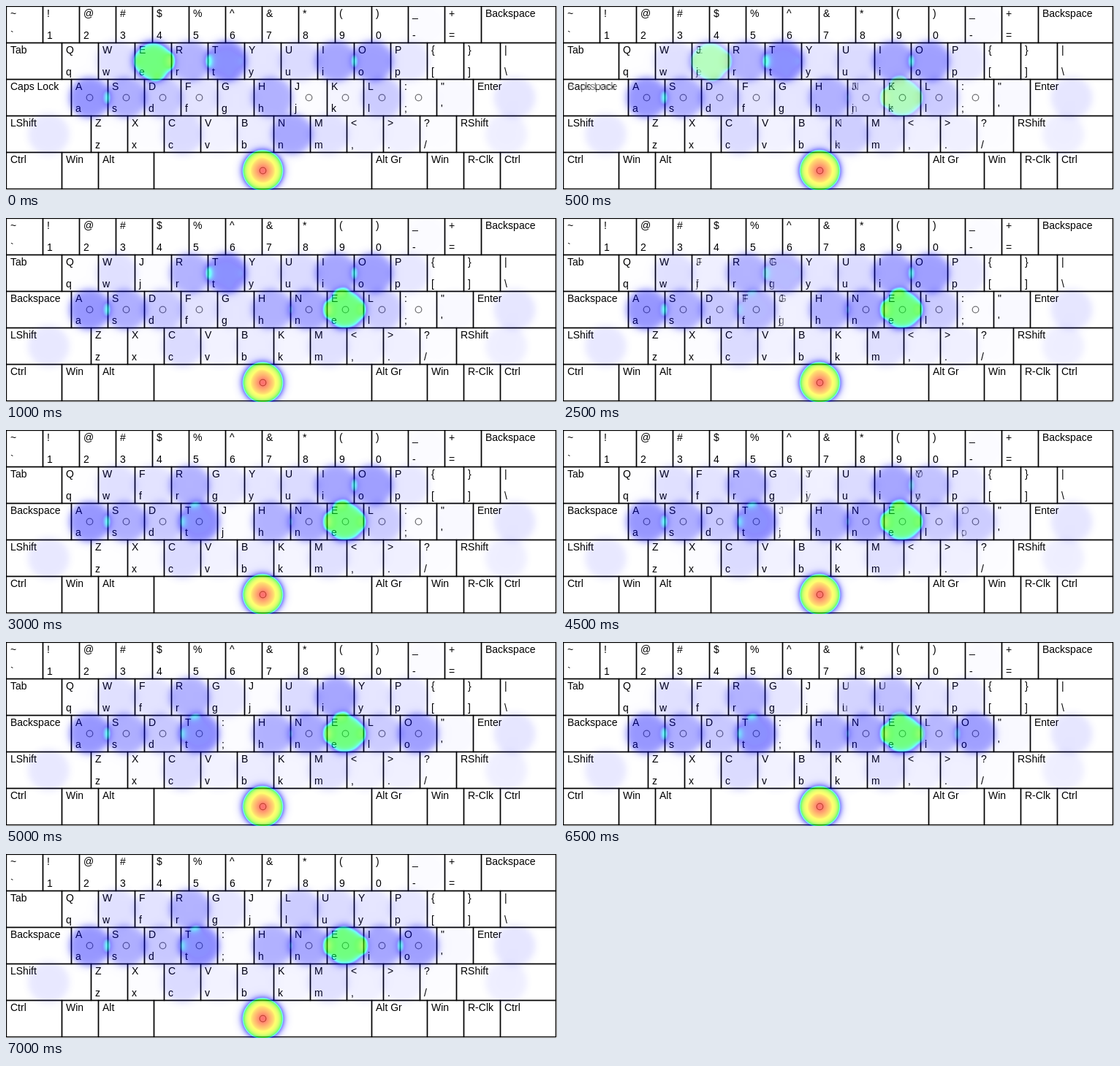
An HTML page with a canvas that plays this animation: 754x252 px, repeating every 8 s.

```html
<!DOCTYPE html>
<html lang="en">
<head>
<meta charset="utf-8">
<title>Keyboard layout heat map</title>
<style>
html, body { margin: 0; width: 754px; height: 252px; overflow: hidden; background: #fff; }
.layer, .layer > * { position: absolute; left: 0; top: 0; width: 754px; height: 252px; display: block; }
text { font: 14px "Liberation Sans", Arial, sans-serif; white-space: pre; }
rect { fill: none; stroke: #000; stroke-width: 1.4; }
circle { fill: none; stroke: #777; stroke-width: 1.3; }
</style>
</head>
<body>
<script>
const W = 754, H = 252, LOOP = 8000;

// Letter rows of each layout, and the label of the key left of the home row.
const layouts = [
  ["qwertyuiop", "asdfghjkl;", "zxcvbnm", "Caps Lock"],
  ["qwjrtyuiop", "asdfghnel;", "zxcvbkm", "Backspace"],
  ["qwfrgyuiop", "asdtjhnel;", "zxcvbkm", "Backspace"],
  ["qwfrgjuiyp", "asdt;hnelo", "zxcvbkm", "Backspace"],
  ["qwfrgjluyp", "asdt;hneio", "zxcvbkm", "Backspace"]
];

// Key use in percent of typed characters.
const freq = {
  e: 12.8, t: 9.1, a: 8.2, o: 7.5, i: 7, n: 6.8, s: 6.3, h: 6.1, r: 6, d: 4.3, l: 4,
  c: 2.8, u: 2.8, m: 2.4, w: 2.4, f: 2.2, g: 2, y: 2, p: 1.9, b: 1.5, v: 1, k: 0.8,
  j: 0.2, x: 0.2, q: 0.1, z: 0.1, ",": 1.2, ".": 1.2, "'": 0.5, "-": 0.3, ";": 0.2,
  "/": 0.2, LShift: 1.8, RShift: 1.3, Enter: 2
};
const shifted = {
  "`": "~", "1": "!", "2": "@", "3": "#", "4": "$", "5": "%", "6": "^", "7": "&",
  "8": "*", "9": "(", "0": ")", "-": "_", "=": "+", "[": "{", "]": "}", "\\": "|",
  ";": ":", "'": "\"", ",": "<", ".": ">", "/": "?"
};

// Colour stops: level, red, green, blue.
const ramp = [
  [0.45, 0, 0, 255], [0.55, 0, 255, 255], [0.65, 0, 255, 0],
  [0.95, 255, 255, 0], [1, 255, 0, 0]
];

function keysOf([top, home, bottom, caps]) {
  const rows = [
    [0, ..."`1234567890-=", ["Backspace", 650]],
    [76, ["Tab", 0], ...top, ..."[]", ["\\", 676]],
    [89, [caps, 0], ...home, "'", ["Enter", 639]],
    [116, ["LShift", 0], ...bottom, ...",./", ["RShift", 616]],
    [0, ["Ctrl", 0], ["Win", 76], ["Alt", 126], ["", 202], ["Alt Gr", 500],
      ["Win", 576], ["R-Clk", 626], ["Ctrl", 676]]
  ];
  const keys = [];
  rows.forEach(([x0, ...row], r) => {
    let next = x0;
    const line = row.map(k => {
      if (Array.isArray(k)) return { name: k[0], x: k[1] };
      const key = { name: k, x: next };
      next += 50;
      return key;
    });
    line.forEach((k, i) => {
      k.y = r * 50;
      k.w = (i + 1 < line.length ? line[i + 1].x : 752) - k.x;
      keys.push(k);
    });
  });
  return keys;
}

function add(parent, tag, attrs, content) {
  const el = document.createElementNS("http://www.w3.org/2000/svg", tag);
  for (const a in attrs) el.setAttribute(a, attrs[a]);
  if (content) el.textContent = content;
  parent.appendChild(el);
  return el;
}

function drawKeys(svg, keys) {
  for (const { name, x, y, w } of keys) {
    add(svg, "rect", { x: x + 0.5, y: y + 0.5, width: w, height: 50 });
    const single = name.length === 1;
    const upper = single ? shifted[name] || name.toUpperCase() : name;
    add(svg, "text", { x: x + 6, y: y + 15 }, upper);
    if (single) add(svg, "text", { x: x + 6, y: y + 45 }, name);
  }
  for (const i of [0, 1, 2, 3, 6, 7, 8, 9])
    add(svg, "circle", { cx: 114.5 + i * 50, cy: 125.5, r: 4.3 });
  add(svg, "circle", { cx: 351.5, cy: 225.5, r: 4.3 });
}

function centre({ name, x, y, w }) {
  const cx = name === "\\" ? 701 : name === "RShift" ? 684 : x + w / 2;
  return [cx + 0.5, y + 25.5];
}

function heatField(keys) {
  const field = new Float32Array(W * H);
  for (const k of keys) {
    const space = k.name === "";
    const level = space ? 0.965 : (freq[k.name] || 0) * 0.05;
    if (!level) continue;
    const [cx, cy] = centre(k);
    for (let y = Math.max(0, cy - 45 | 0); y < Math.min(H, cy + 45); y++)
      for (let x = Math.max(0, cx - 45 | 0); x < Math.min(W, cx + 45); x++) {
        const r = Math.hypot(x + 0.5 - cx, y + 0.5 - cy);
        let v = level / (1 + Math.exp((r - 28) / 2.7));
        if (space) v += 0.035 * Math.exp(-r * r / 100);
        field[y * W + x] += v;
      }
  }
  return field;
}

function colour(v) {
  if (v <= ramp[0][0]) return ramp[0].slice(1);
  const i = ramp.findIndex(s => v <= s[0]);
  if (i < 0) return ramp[4].slice(1);
  const a = ramp[i - 1], b = ramp[i], f = (v - a[0]) / (b[0] - a[0]);
  return [1, 2, 3].map(c => a[c] + (b[c] - a[c]) * f);
}

function drawHeat(canvas, keys) {
  canvas.width = W;
  canvas.height = H;
  const ctx = canvas.getContext("2d");
  const img = ctx.createImageData(W, H);
  heatField(keys).forEach((v, i) => {
    if (v < 0.004) return;
    img.data.set([...colour(v), Math.min(v, 0.56) * 255], i * 4);
  });
  ctx.putImageData(img, 0, 0);
}

const layers = layouts.map(layout => {
  const keys = keysOf(layout);
  const layer = document.createElement("div");
  layer.className = "layer";
  layer.style.background = "#fff";
  drawKeys(add(layer, "svg", { viewBox: `0 0 ${W} ${H}` }), keys);
  const canvas = document.createElement("canvas");
  drawHeat(canvas, keys);
  layer.appendChild(canvas);
  document.body.appendChild(layer);
  return layer;
});

// Each layout is mixed half in for 500 ms, then shown alone.
const starts = [0, 500, 2500, 4500, 6500];

function draw(t) {
  layers.forEach((layer, i) => {
    const age = t - starts[i];
    layer.style.opacity = i === 0 || age >= 500 ? 1 : age >= 0 ? 0.5 : 0;
  });
}

function tick() {
  draw(performance.now() % LOOP);
  requestAnimationFrame(tick);
}
draw(0);
requestAnimationFrame(tick);
</script>
</body>
</html>
```
